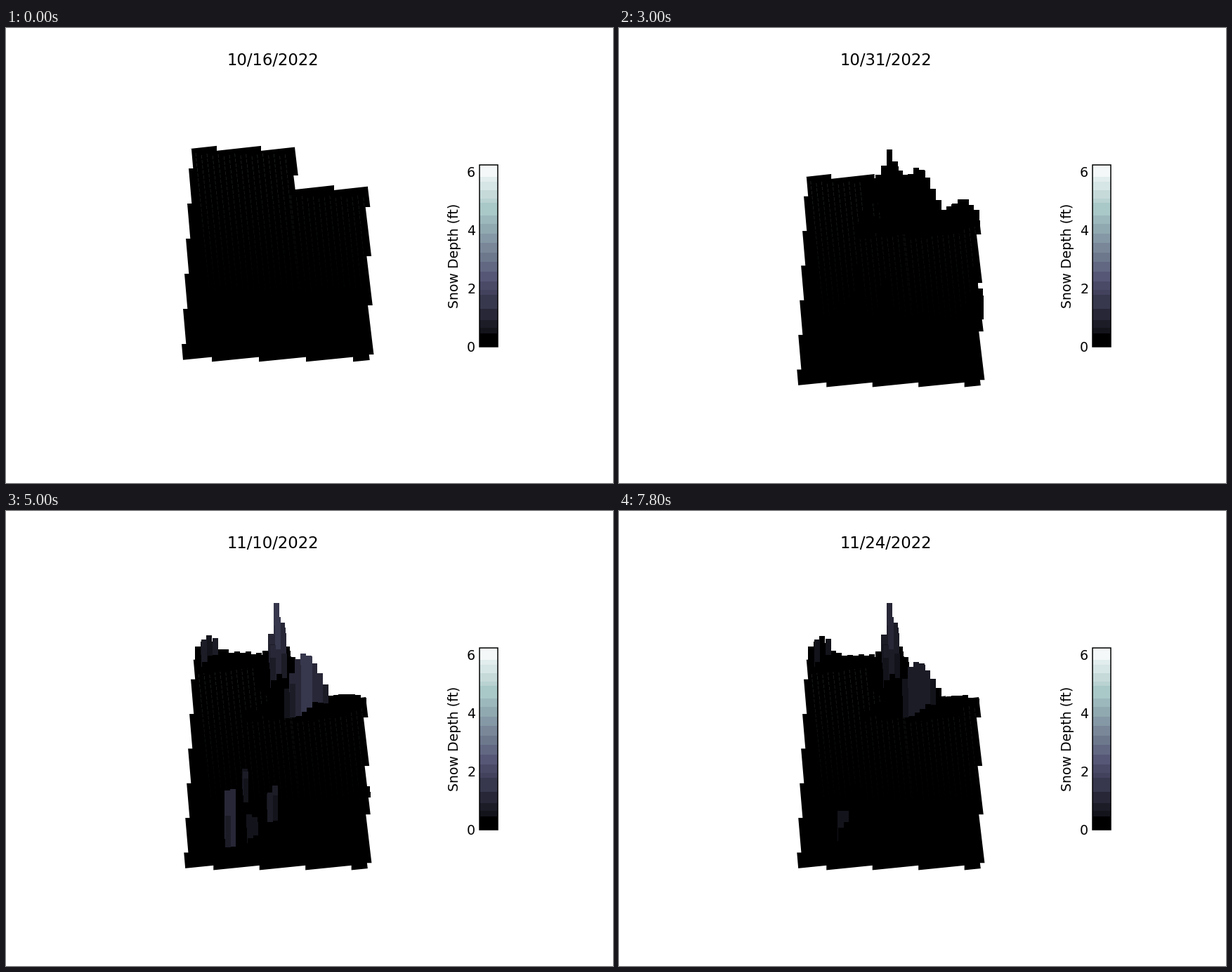
Recreate the animation shown at these times as a matplotlib script. Size 864 px wide and 648 px high, loop 8000 ms.

```python
import numpy as np
import matplotlib
import matplotlib.pyplot as plt
from matplotlib.animation import FuncAnimation
from matplotlib.collections import LineCollection, PolyCollection
from matplotlib.patches import Polygon, Rectangle
from matplotlib.path import Path

W, H, DAYS, STEP = 864, 648, 40, 200
FIRST_SNOW = 7
COL, ROW, TILT, TALLEST = 7.85, 6.9, 0.11, 82.5

# Snow fields: x, y, half width, half depth (px), October feet, November feet,
# first November day, daily melt rate
FIELDS = np.array([
    (385.8, 226, 13, 28, 0.38, 1.60, 19, 0.02),
    (426, 282, 32, 8.5, 0.75, 1.40, 19, 0.03),
    (319, 466, 9, 7, 0.78, 1.40, 22, 0.06),
    (379, 432, 12, 9, 0.78, 0.75, 22, 0.03),
    (340, 406, 7, 12, 0.65, 0.60, 22, 0.10),
    (352, 290, 7, 7, 0.72, 0.00, 22, 0.10),
    (289, 216, 18, 8, 0.00, 0.75, 22, 0.02),
    (330, 213, 42, 8, 0.00, 0.24, 20, 0.06),
    (349, 466, 16, 9, 0.00, 0.60, 22, 0.10),
    (488, 270, 22, 6, 0.25, 0.14, 19, 0.05),
    (508, 398, 9, 10, 0.50, 0.00, 22, 0.10)])

# Colour bar band edges in px, shared by the snow shading
BAR_TOP, BAR_FOOT, FOOT_PX = 194, 454, 41.5
BANDS = np.array([454, 435, 427, 416, 400, 380, 373, 361, 347, 333, 320, 306,
                  293, 279, 267, 249, 243, 231, 219, 212, 194])

plt.rcParams["font.family"] = "DejaVu Sans"
fig = plt.figure(figsize=(12, 9), dpi=72, facecolor="white")
ax = fig.add_axes([0, 0, 1, 1])
ax.set_xlim(0, W)
ax.set_ylim(H, 0)
ax.axis("off")

band_mid = (BAR_FOOT - (BANDS[:-1] + BANDS[1:]) / 2) / (BAR_FOOT - BAR_TOP)
SHADES = matplotlib.colormaps["bone"](band_mid)
SHADES[0, :3] = 0


def stairs(start, way, length, first, period, slope, jump):
    """Saw-toothed edge from start; way is one of the four axis directions."""
    way = np.array(way)
    side = np.abs(way[::-1])
    pts, off = [np.array(start, float)], 0
    for s in np.arange(first, length, period):
        for hop in (0, jump):
            off += hop
            pts.append(pts[0] + way * s + side * (slope * s + off))
    pts.append(pts[0] + way * length + side * (slope * length + off))
    return pts


def settle(pts):
    """Move ground points to the layout used once snow has fallen."""
    return np.asarray(pts) * (0.977, 0.987) + (9, 42.3)


def make_outline():
    east, south, west, north = (1, 0), (0, 1), (-1, 0), (0, -1)
    return np.array(
        stairs((262, 172), east, 149, 38, 63, -TILT, 7)
        + stairs((411, 170), south, 60, 40, 63, 0.12, -6.5)
        + stairs((412, 230), east, 103, 55, 63, -TILT, 7)
        + stairs((515, 227), south, 246, 28, 70, 0.12, -6.7)
        + stairs((517, 473), west, 265, 23, 67, 0.1, -6.7)
        + stairs((252, 473), north, 301, 23, 50, -0.086, 6.3))


def make_slits():
    """Faint gaps between the flat columns, fading southwards."""
    segs, rgba = [], []
    for x0 in 270 + 7.95 * np.arange(31):
        top = 178 if x0 < 405 else 238
        for y in np.arange(top + x0 % 5, 372, 7.2):
            x = x0 + 0.1 * (y - top)
            if x < 512:
                segs.append([(x, y), (x + 0.4, y + 5)])
                rgba.append((0.75, 0.8, 0.8, 0.25 * (1 - (y - 170) / 215)))
    return np.array(segs), rgba


def make_grid(outline):
    """Tilted grid cells inside the outline, back row first."""
    c, r = np.meshgrid(np.arange(-12, 32), np.arange(-2, 50))
    x = (301.5 + COL * c + 0.7 * r).ravel()
    y = (215 - TILT * COL * c + ROW * r).ravel()
    middle = np.column_stack([x + COL / 2, y + ROW / 2])
    keep = Path(outline).contains_points(middle)
    x, y = x[keep], y[keep]
    order = np.argsort(y, kind="stable")
    return x[order], y[order]


def field_feet(day):
    """Depth at the heart of each field: two storms, each followed by melting."""
    october, november, start, melt = FIELDS[:, 4:].T
    p = np.clip((day - start) / (25 - start), 0, 1)
    fall = november * (1 - (1 - p) ** 1.8) * np.exp(-melt * max(0, day - 25))
    return october * np.exp(-0.11 * (day - 9)) + fall


def bars_on(day):
    feet = field_feet(day)
    depth = (feet @ shapes) * rough
    rise = TALLEST * np.minimum(depth / (0.93 * feet.max()), 1)
    band = np.searchsorted(BAR_FOOT - BANDS, depth * FOOT_PX, side="right") - 1
    up = rise > 1
    x, foot, top = grid_x[up], grid_y[up] + ROW, (grid_y - rise)[up]
    right = x + COL
    verts = np.stack([np.column_stack(p) for p in
                      ((x, top), (right, top), (right, foot), (x, foot))], axis=1)
    return verts, SHADES[band[up]]


def draw_colorbar():
    for low, high, color in zip(BANDS, BANDS[1:], SHADES):
        ax.add_patch(Rectangle((673.5, high), 26.5, low - high, fc=color, lw=0,
                               antialiased=False))
    ax.add_patch(Rectangle((673.5, 194.5), 26.5, 259.3, fill=False, ec="black", lw=1.5))
    for v in (0, 2, 4, 6):
        ax.text(668.2, 460.8 - FOOT_PX * v, str(v), size=19, ha="right", va="baseline")
    ax.text(643.5, 324.2, "Snow Depth (ft)", size=18.9, rotation=90,
            rotation_mode="anchor", ha="center", va="baseline")


outline = make_outline()
slit_segs, slit_rgba = make_slits()
grid_x, grid_y = make_grid(settle(outline))
fx, fy, half_w, half_d = FIELDS[:, :4].T[:, :, None]
dy = grid_y - fy
dx = grid_x + COL / 2 - fx - 0.1 * dy
shapes = np.exp(-(dx / half_w) ** 2 - (dy / half_d) ** 4)
rough = 1 - 0.4 * np.random.default_rng(4).random(grid_x.size) ** 3

ground = ax.add_patch(Polygon(outline, fc="black", lw=0))
slits = ax.add_collection(LineCollection(slit_segs, colors=slit_rgba, linewidths=0.6))
bars = ax.add_collection(PolyCollection([], lw=0, antialiased=False, zorder=3))
title = ax.text(380, 53.2, "", size=22.7, ha="center", va="baseline")
draw_colorbar()


def update(day):
    date = np.datetime64("2022-10-16") + day
    year, month, dom = str(date).split("-")
    title.set_text(f"{month}/{dom}/{year}")
    snowy = day >= FIRST_SNOW
    ground.set_xy(settle(outline) if snowy else outline)
    slits.set_segments(settle(slit_segs) if snowy else slit_segs)
    verts, colors = bars_on(day) if snowy else ([], "none")
    bars.set_verts(verts)
    bars.set_facecolor(colors)
    return ground, slits, bars, title


anim = FuncAnimation(fig, update, frames=DAYS, interval=STEP, repeat=True,
                     repeat_delay=0, blit=False)
plt.show()
```
